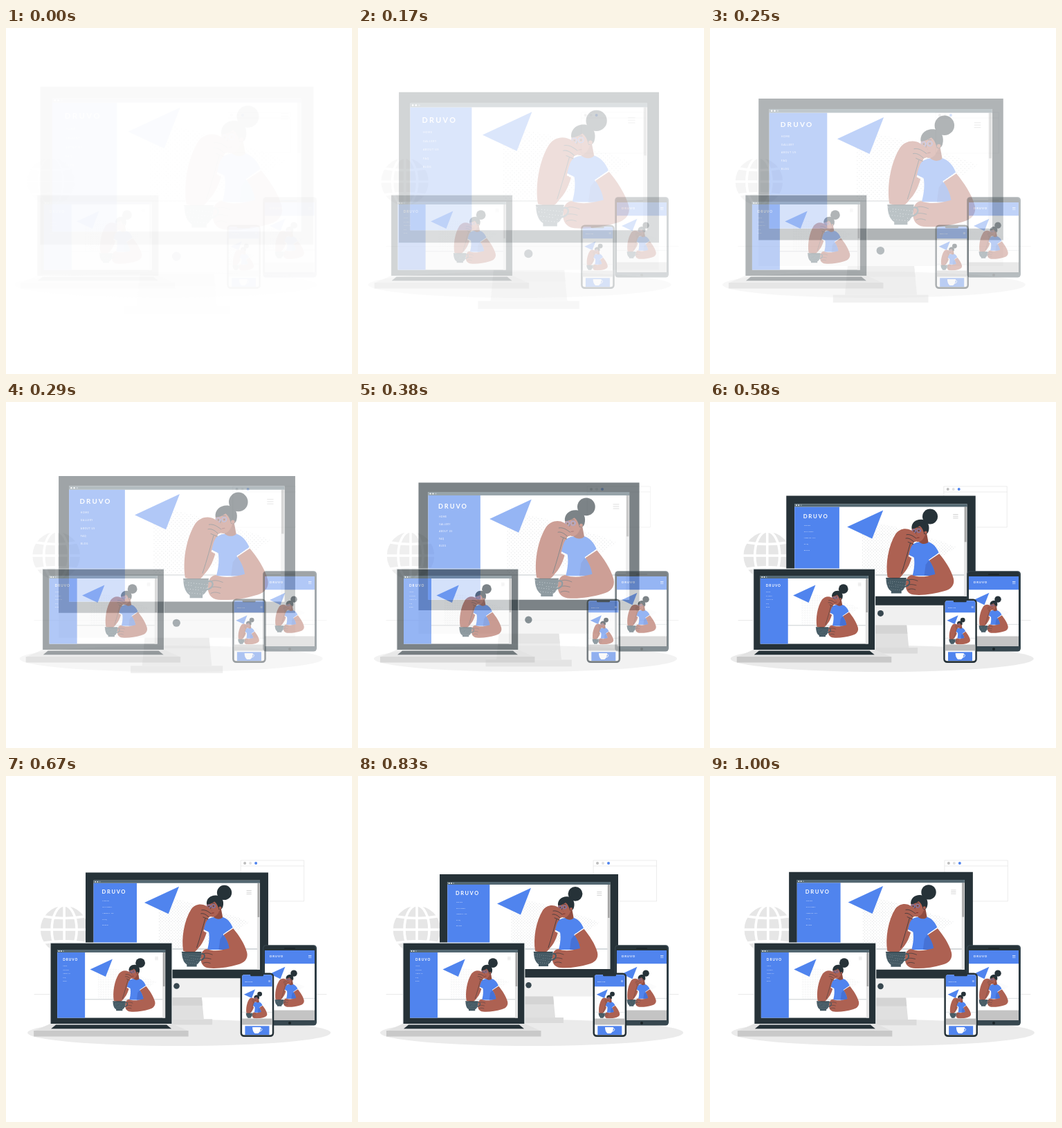
Recreate the animation shown at these times as an HTML page with a canvas. Size 500x500 px, loop 1040 ms.

```html
<!DOCTYPE html>
<html lang="en">
<head>
<meta charset="utf-8">
<title>Responsive devices</title>
<style>
html, body { margin: 0; width: 100%; height: 100%; overflow: hidden; background: #fff; }
canvas { display: block; width: 500px; height: 500px; }
</style>
</head>
<body>
<canvas id="stage"></canvas>
<script>
const SIZE = 500, LOOP = 1040;
const BLUE = '#5084ee', DARK = '#263238', SLATE = '#455a64', SKIN = '#ad6152', BRAND = 'DRUVO';
const MENU = ['HOME', 'GALLERY', 'ABOUT US', 'FAQ', 'BLOG'];
const dpr = window.devicePixelRatio || 1;
const stage = document.getElementById('stage');
const buffer = document.createElement('canvas');
stage.width = stage.height = buffer.width = buffer.height = Math.round(SIZE * dpr);
const out = stage.getContext('2d'), c = buffer.getContext('2d');

// drawing helpers
function rect(color, x, y, w, h, r = 0) {
  c.fillStyle = color;
  c.beginPath();
  c.roundRect(x, y, w, h, r);
  c.fill();
}
function dot(color, x, y, r) {
  c.fillStyle = color;
  c.beginPath();
  c.arc(x, y, r, 0, Math.PI * 2);
  c.fill();
}
function fill(color, d) {
  c.fillStyle = color;
  c.fill(new Path2D(d));
}
function line(color, width, d) {
  c.strokeStyle = color;
  c.lineWidth = width;
  c.stroke(new Path2D(d));
}
function clipped(x, y, w, h, draw) {
  c.save();
  c.beginPath();
  c.rect(x, y, w, h);
  c.clip();
  draw();
  c.restore();
}
function label(text, x, y, k, size = 7.4, gap = 1.6, weight = 700) {
  c.save();
  c.translate(x, y);
  c.scale(k, k);
  c.font = `${weight} ${size}px Lato, sans-serif`;
  c.letterSpacing = gap + 'px';
  c.fillStyle = '#fff';
  c.fillText(text, 0, 0);
  c.restore();
}
function burger(color, x, y, w, gap) {
  for (let i = 0; i < 3; i++) rect(color, x, y + i * gap, w, gap * 0.35);
}

// picture shown on every screen
function dots() {
  c.save();
  c.clip(new Path2D('M221 188L240 179L265 184L300 196L330 204L349 212L335 222L300 238L250 249L221 249Z'));
  c.fillStyle = '#cfd2d4';
  c.beginPath();
  for (let r = 0; r < 35; r++) {
    for (let x = 220 + (r % 2) * 2.1; x < 350; x += 4.2) {
      c.moveTo(x + 0.5, 180 + r * 2.1);
      c.arc(x, 180 + r * 2.1, 0.5, 0, 7);
    }
  }
  c.fill();
  c.restore();
}
function trim(d) {
  c.setLineDash([0.01, 2.1]);
  line('#fff', 2.3, d);
  c.setLineDash([]);
}
function woman() {
  fill(SKIN, 'M282 222L289 226C286 237 281 247 272 253Z');
  fill('#8f4c40', 'M299 199L309 191L312 207C307 211 302 210 299 206Z');
  fill(BLUE, 'M299 205C304 209 309 208 312 205C318 207 323 212 326 220L313 229C317 236 321 243 322 251L290 251C293 240 293 232 292 226L281 221C284 213 290 206 299 205Z');
  fill('#4672d6', 'M308 236L313 229C318 237 321 244 322 251L306 251Z');
  trim('M282 222L291 227');
  trim('M313.5 229.5L326.5 220.5');
  fill(SKIN, 'M290 183C288 191 288 200 293 203C297 206 302 205 305 200L310 190L307 180Z');
  fill(DARK, 'M289 187C288 178 296 173 304 174.5C311 176 314 183 312 190C311 194 308 195 306 194C305 189 303 185 300 183C296 186 292 187 289 187Z');
  dot(DARK, 314, 170.3, 10.4);
  dot(SKIN, 308, 192, 2);
  dot(DARK, 292.2, 190, 0.8);
  dot(DARK, 298.6, 189.5, 0.8);
  line(BLUE, 0.7, 'M294.4 190A2.3 2.5 0 1 0 289.8 190A2.3 2.5 0 1 0 294.4 190M301.2 189.5A2.6 2.6 0 1 0 296 189.5A2.6 2.6 0 1 0 301.2 189.5');
  line(DARK, 0.6, 'M290 186.5L293 185.8M297 185.5L300 185.5M295 191L294 195L296 195.5');
  line('#7a2f2a', 0.9, 'M295 199.5L299 199');
  fill(SKIN, 'M256 253C253 235 257 210 267 194C272 187 281 185 288 189L295 194C298 197 297 199 295 200C297 203 295 205 292 205L291 208C286 212 285 225 283 232C280 245 276 254 268 256Z');
  line(DARK, 0.7, 'M287 207C283 221 280 233 275 248M282 195C287 194 291 197 295 200M281 200C285 199 289 202 292 205M284 205L291 208');
  fill(SKIN, 'M313 230L326.5 221C334 230 343 243 346 255C348 264 342 270 333 272C320 276 305 278 292 277C284 276 280 270 281 262C281 255 284 251 289 250C300 254 309 252 321 249C320 242 317 236 313 230Z');
  line(DARK, 0.6, 'M284 257C288 255 292 256 297 258M283 264C287 262 291 263 295 264M284 270C288 268 291 269 294 270');
}
function cup() {
  line(SLATE, 1.8, 'M281 257C288 255 288 265 279 266');
  const bowl = 'M254 254L281.5 254C282 264 279 270 275 272L275 275L261 275L261 272C256 269 254 262 254 254Z';
  fill(SLATE, bowl);
  c.save();
  c.clip(new Path2D(bowl));
  for (let i = 0; i < 34; i++) {
    dot('#a5b1b7', 255 + (i * 7.7) % 26, 256.5 + (i * 4.9) % 15, 0.45);
  }
  c.restore();
  line(DARK, 0.7, 'M254 254.3L281.5 254.3');
}
function scene(x, y, k, planeX = 0, planeY = 0) {
  c.save();
  c.translate(x, y);
  c.scale(k, k);
  c.translate(-314, -170);
  dots();
  line('#78868d', 0.6, 'M60 250H440');
  c.save();
  c.translate(planeX / k, planeY / k);
  fill(BLUE, 'M201 184.5L250 161.7L235 200.4Z');
  c.restore();
  woman();
  cup();
  c.restore();
}

// wide page with side menu
function page(x, y, w, h, side, k, thumb, drawScene) {
  rect('#fff', x, y, w, h);
  clipped(x, y, w, h, drawScene);
  rect(BLUE, x, y + 4, side, h - 4);
  rect('#e4e4e4', x + w - 4, y + 4, 4, h - 4);
  rect('#a6a6a6', x + w - 3.3, y + 4, 2.6, thumb);
  rect('#546872', x, y, w, 4);
  for (let i = 0; i < 3; i++) dot(i < 2 ? '#fff' : '#90a0a8', x + 2.5 + i * 3.2, y + 2, 0.9);
  burger('#cfcfcf', x + w - 12 * k - 7, y + 10 * k + 4, 7 * k, 2.5 * k);
}
function menu(x, y, k, step) {
  MENU.forEach((t, i) => label(t, x, y + i * step, k, 2.4, 0.5, 400));
}

// parts of the picture
function shadow() {
  c.fillStyle = '#ebebeb';
  c.beginPath();
  c.ellipse(251, 371, 219, 19, 0, 0, 7);
  c.fill();
}
function floor() {
  line('#e0e0e0', 0.7, 'M41 315.5H463');
}
function globe() {
  dot('#e6e6e6', 85, 222, 34.3);
  line('#fff', 3.6, 'M85 187V257M50 222H120M56 203Q85 208 114 203M56 241Q85 236 114 241');
  c.beginPath();
  c.ellipse(85, 222, 18, 35, 0, 0, 7);
  c.stroke();
}
function card() {
  rect('#fff', 340.5, 122, 91, 59);
  line('#e4e4e4', 0.7, 'M340.5 122H431.5V181H340.5ZM340.5 130H431.5');
  dot('#bdbdbd', 346, 126, 2);
  dot('#e0e0e0', 354, 126, 2);
  dot(BLUE, 362, 126, 2);
}
function monitor() {
  fill('#e0e0e0', 'M212 318H282L285 349H209Z');
  fill('#d4d4d4', 'M212 318H282L283.2 330H210.8Z');
  rect('#dbdbdb', 196.5, 349, 100.5, 8);
  rect('#f0f0f0', 118, 290, 258, 28.5);
  dot('#37474f', 246.5, 302.3, 4.2);
  rect(DARK, 118, 142, 258, 149.3);
  page(129.3, 153, 235, 126, 61, 1, 48, () => scene(314, 170, 1));
  label(BRAND, 141, 172.2, 1);
  menu(142, 183, 1, 8.5);
}
function laptop() {
  fill('#e2e2e2', 'M65 358H241L264.5 368.5H41Z');
  rect('#c9c9c9', 41, 368, 223.5, 8.4);
  fill(DARK, 'M73 359.5H233L240 365.3H66Z');
  rect('#eceff0', 64.4, 240.6, 177, 118, 1);
  rect(DARK, 65.5, 241.7, 174.8, 116.3);
  page(75, 251, 156, 98.5, 40, 0.66, 49, () => scene(195, 270, 0.66, 2, 0));
  label(BRAND, 83, 267.3, 0.64);
  menu(83.3, 275, 0.66, 5.6);
}
function tablet() {
  rect('#37474f', 371.2, 244.3, 77.8, 116.2, 4.5);
  rect(DARK, 372.2, 245.3, 75, 114, 4);
  rect('#37474f', 373, 353, 75, 6.8, 2);
  rect('#10181c', 402, 248.4, 16, 1.2, 0.6);
  dot('#182226', 410, 356.9, 2);
  rect('#fff', 374, 252, 72, 101);
  clipped(374, 271, 72, 67, () => scene(416, 285, 0.455, 16.5, -5.5));
  rect(BLUE, 374, 252, 72, 19.3);
  rect('#c4c4c4', 374, 338.5, 72, 14.5);
  label(BRAND, 381, 262.3, 0.58);
  burger('#fff', 437, 259, 4.4, 1.5);
}
function phone() {
  rect(DARK, 339.5, 284.4, 48.6, 92.6, 5.5);
  rect('#fff', 342, 287.3, 43.6, 87, 3);
  clipped(342, 304, 43.6, 46.5, () => scene(367.5, 315, 0.33, 14.5, -4));
  rect(BLUE, 342, 287.3, 43.6, 17, [3, 3, 0, 0]);
  rect(DARK, 354, 286, 19, 3.3, 1.4);
  label(BRAND, 346, 298, 0.34);
  burger('#fff', 380, 295.3, 3, 1.1);
  rect('#bdbdbd', 342, 350.5, 43.6, 9);
  rect(BLUE, 346.3, 361.3, 35, 12.7);
  fill('#fff', 'M357 363H369C369 368 367 371 365 372H360.5C358 370 357 367 357 363Z');
  line('#fff', 1, 'M368.5 364.5C372 364 371.5 369 367.5 369');
}

// zoom excess over time, counted in 1/24 s ticks
const ZOOM = [[1, 0.53], [4, 0.457], [7, 0.325], [12, 0.116], [16, 0.023], [20, 0], [24, 0.03]];
function slope(i) {
  const a = ZOOM[i - 1], b = ZOOM[i + 1];
  return a && b ? (b[1] - a[1]) / (b[0] - a[0]) : a ? 0.01 : -0.01;
}
function zoomAt(tick) {
  let i = 0;
  while (i < ZOOM.length - 2 && tick > ZOOM[i + 1][0]) i++;
  const [t0, v0] = ZOOM[i], [t1, v1] = ZOOM[i + 1];
  const w = t1 - t0, u = (tick - t0) / w, q = 1 - u;
  return v0 * q * q * (1 + 2 * u) + v1 * u * u * (3 - 2 * u)
    + w * u * q * (slope(i) * q - slope(i + 1) * u);
}

function layer(draw, alpha, dx = 0, scale = 1) {
  c.setTransform(dpr, 0, 0, dpr, 0, 0);
  c.clearRect(0, 0, SIZE, SIZE);
  c.lineCap = c.lineJoin = 'round';
  c.translate(247 + dx, 250);
  c.scale(scale, scale);
  c.translate(-247, -250);
  draw();
  out.globalAlpha = alpha;
  out.drawImage(buffer, 0, 0);
}
function render(ms) {
  const tick = Math.min(24, Math.max(1, Math.floor((ms / 10 + 0.5) * 0.24)));
  const alpha = Math.min(1, Math.max(0.022, 0.08 * (tick - 1.5)));
  const zoom = zoomAt(tick), dx = -38 * zoom;
  out.globalAlpha = 1;
  out.fillStyle = '#fff';
  out.fillRect(0, 0, stage.width, stage.height);
  layer(shadow, alpha, dx);
  layer(floor, alpha);
  layer(globe, alpha, dx);
  layer(card, alpha, dx);
  layer(monitor, alpha, 0, 1 + zoom);
  layer(tablet, alpha);
  layer(phone, alpha, dx);
  layer(laptop, alpha, dx);
}

const start = performance.now();
function loop() {
  render((performance.now() - start) % LOOP);
  requestAnimationFrame(loop);
}
loop();
</script>
</body>
</html>
```
